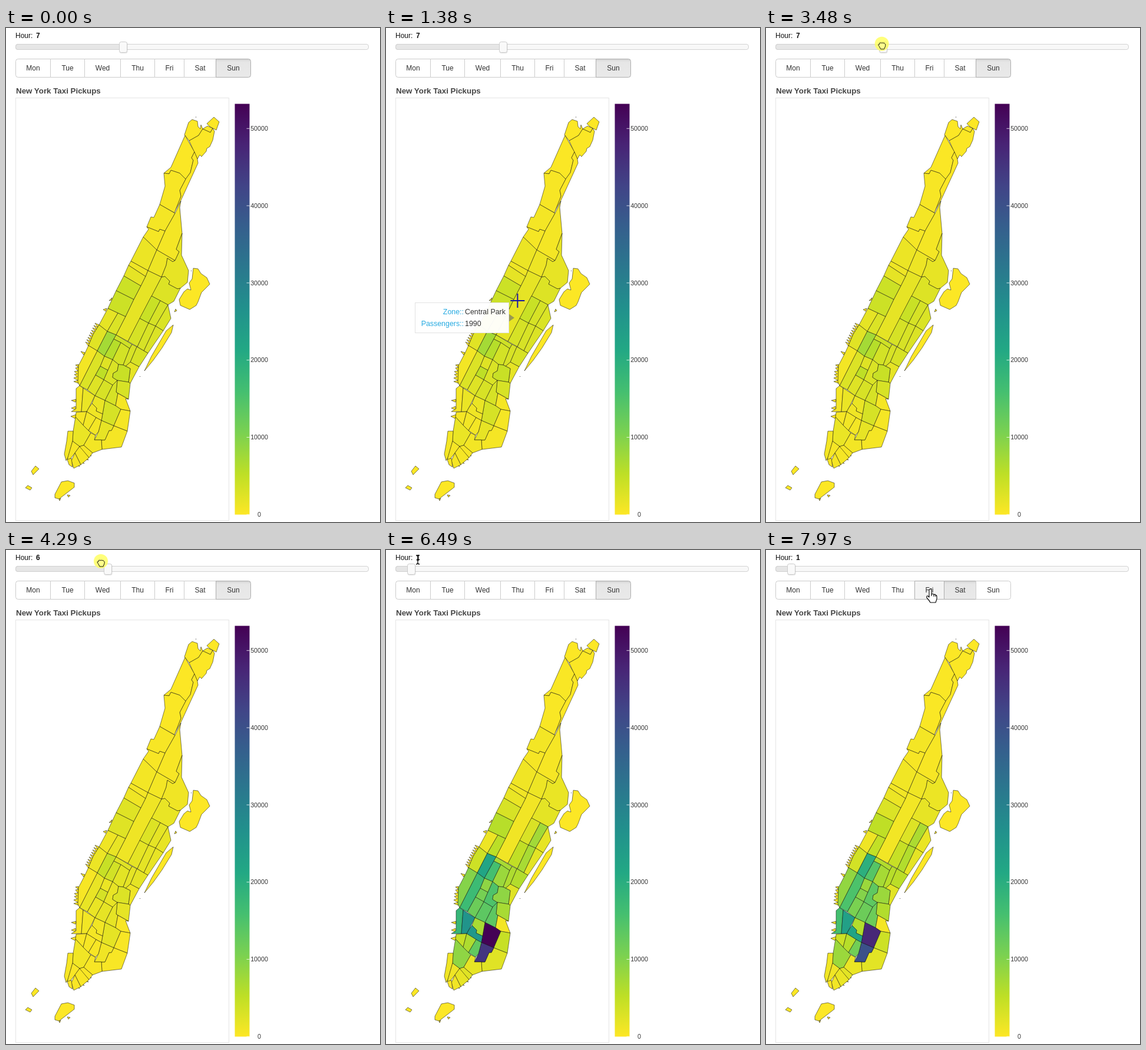
An HTML page that plays this animation: 635x837 px, repeating every 8000 ms.

```html
<!DOCTYPE html>
<html lang="en">
<head>
<meta charset="utf-8">
<title>Taxi pickups</title>
<style>
html, body { margin: 0; width: 100%; height: 100%; overflow: hidden; background: #fff; }
svg { display: block; width: 635px; height: 837px; font: 12px "Liberation Sans", Arial, sans-serif; }
#zones path, #piers { stroke: #000; stroke-opacity: .5; stroke-width: 1; stroke-linejoin: round; }
#piers { fill: #fde725; }
.outline { fill: #fff; stroke: #000; stroke-width: 1.1; stroke-linejoin: round; }
</style>
</head>
<body>
<svg viewBox="0 0 635 837">
  <defs>
    <linearGradient id="scale" x2="0" y2="1"></linearGradient>
    <linearGradient id="pressed" x2="0" y2="1">
      <stop offset="0" stop-color="#d2d2d2"/><stop offset=".16" stop-color="#e6e6e6"/><stop offset="1" stop-color="#e9e9e9"/>
    </linearGradient>
  </defs>

  <text x="16" y="17" fill="#111">Hour:</text>
  <text id="hour" x="51" y="17" fill="#111" font-weight="bold"></text>
  <rect x="16.5" y="27.5" width="599" height="9" rx="3.5" fill="#f8f8f8" stroke="#d3d3d3"/>
  <rect id="done" x="16.5" y="27.5" height="9" rx="3.5" fill="#e6e6e6" stroke="#d0d0d0"/>
  <g id="handle">
    <rect x="-6.5" y="24" width="14" height="19" rx="3" fill="#000" opacity=".1"/>
    <rect x="-6.5" y="23.5" width="13" height="18" rx="3" fill="#f9f9f9" stroke="#ccc"/>
  </g>
  <g id="buttons"></g>

  <text x="17" y="111" font-size="13.33" font-weight="bold" fill="#444">New York Taxi Pickups</text>
  <rect x="16.5" y="118.5" width="362" height="716" fill="#fff" stroke="#e5e5e5"/>
  <path id="piers" d="M158 503l-7-3 5 7-7-3 5 7-7-3 5 7-7-3 5 7-7-3 5 7-7-3 5 7-7-3 5 7-7-3 5 7-7-3 5 7ZM180 457l-5 5 4-1zM171 475l-6 2 4 3zM134 550l-7-2 5 6zM123 570l-5 1 5 4-5 1 4 5-6 1 5 4-5 1 5 4-6 2 7 4-7 2 8 3zM119 629l-8 2 7 3zM118 641l-7 3 7 3zM119 655l-9 3 8 4zM142 722l3 3-4 0zM137 728l3 4-5-1zM129 734l4 4-5-2zM121 737l4 6-5-3z"/>
  <g id="zones">
    <path data-v=".1 .1 .1" d="M341 162L353 151 362 159 357 173 346 167Z"/>
    <path data-v=".1 .1 .1" d="M310 160L316 155 325 158 326 167 330 171 331 164 334 171 327 182 311 191 303 181Z"/>
    <path data-v=".1 .1 .1" d="M334 171L342 166 351 170 347 177Z"/>
    <path data-v=".2 .1 .2" d="M311 191L327 182 334 171 347 177 351 170 354 175 351 190 346 201 341 204 340 209 332 218 329 215 325 222 319 209Z"/>
    <path data-v=".2 .2 .3" d="M304 182L320 210 315 220 318 224 313 245 305 256 295 246 280 241 277 247 268 246 280 236Z"/>
    <path data-v=".1 .1 .1" d="M320 210L325 222 326 229 297 292 285 313 297 285 295 275 305 256 313 245 318 224 315 220Z"/>
    <path data-v=".6 .2 .3" d="M268 246L277 247 280 241 295 246 305 256 295 275 297 285 286 313 261 299 270 268Z"/>
    <path data-v="1 .5 .8" d="M261 299L287 314 270 344 261 341 259 345 239 337 246 320 251 321Z"/>
    <path data-v="1 .4 .6" d="M287 314L297 293 295 304 299 348 289 375 294 379 287 394 256 376 270 344Z"/>
    <path data-v=".8 .4 .6" d="M239 337L259 345 261 341 270 344 256 376 233 354 242 341Z"/>
    <path data-v="1.8 .5 1.1" d="M233 354L256 376 241 411 212 395Z"/>
    <path data-v="1.7 .8 1.3" d="M256 376L287 394 283 396 274 390 272 402 264 422 241 411Z"/>
    <path data-v="2.3 .9 1.6" d="M299 348L298 385 310 411 308 431 296 441 291 442 276 434 278 429 270 421 264 422 272 402 274 390 283 396 287 394 294 379 289 375Z"/>
    <path data-v="3.4 .8 2.1" d="M264 422L270 421 278 429 276 434 291 442 296 441 285 463 275 469 247 454Z"/>
    <path data-v=".1 .1 .1" d="M318 407L326 408 331 416 341 423 346 434 332 448 326 464 323 470 312 477 296 470 294 460 302 447 308 442 314 444 311 432 316 425Z"/>
    <path data-v="1.6 .5 1" d="M212 395L241 411 237 421 208 402Z"/>
    <path data-v="2.4 .8 1.6" d="M208 402L237 421 229 437 200 420Z"/>
    <path data-v="5.2 1.2 3.2" d="M200 420L229 437 217 460 187 445Z"/>
    <path data-v="5.2 2 5.8" d="M187 445L217 460 203 489 173 475Z"/>
    <path data-v="2.5 .7 1.3" d="M173 475L190 483 172 514 158 503Z"/>
    <path data-v="3.6 1.9 5.5" d="M190 483L203 489 187 520 172 514Z"/>
    <path data-v="2.5 .5 1" d="M241 411L264 422 207 531 187 520 203 489 217 460 229 437 237 421Z"/>
    <path data-v="5.5 1.1 3" d="M247 454L262 462 242 500 227 492Z"/>
    <path data-v="4.2 3.8 7.5" d="M262 462L275 469 254 505 242 500Z"/>
    <path data-v="3.7 .8 1.8" d="M275 469L280 492 267 513 254 505Z"/>
    <path data-v="4.2 1.2 5" d="M227 492L242 500 223 540 207 531Z"/>
    <path data-v="4.1 3.4 7" d="M242 500L254 505 234 547 223 540Z"/>
    <path data-v="3.6 1.3 2.2" d="M254 505L267 513 241 551 234 547Z"/>
    <path data-v=".1 .1 .1" d="M284 503L281 516 265 542 250 563 235 581 247 556 272 513Z"/>
    <path data-v="4.1 3 6.2" d="M222 540L241 551 226 574 211 566Z"/>
    <path data-v="2.5 2 2.5" d="M211 566L226 574 211 602 208 600 211 577 203 573Z"/>

    <path data-v="3 2.8 4" d="M158 503L172 514 155 547 140 538 148 519Z"/>
    <path data-v="9.4 15 22" d="M172 514L187 520 183 527 167 556 155 547Z"/>
    <path data-v="5 5 7" d="M187 520L214 536 210 543 195 533 183 527Z"/>
    <path data-v="7.5 9.5 16" d="M183 527L195 533 181 562 167 556Z"/>
    <path data-v="4.5 2.5 8" d="M195 533L210 543 199 571 191 570 181 562Z"/>
    <path data-v="4.1 3.5 6.5" d="M210 543L214 536 222 540 211 566 203 573 199 571Z"/>
    <path data-v="3.2 3.3 9" d="M167 556L181 562 173 580 160 573Z"/>
    <path data-v="6.7 5 11" d="M160 573L173 580 166 596 152 588Z"/>
    <path data-v="3.7 9.3 15" d="M181 562L191 570 189 581 182 585 181 592 189 597 181 605 166 596 173 580Z"/>
    <path data-v="5.7 4 9" d="M191 570L199 571 211 577 208 600 189 597 181 592 182 585 189 581Z"/>
    <path data-v="4 3.7 7" d="M189 597L208 600 211 602 208 629 187 617Z"/>
    <path data-v="4 8 13.5" d="M189 597L187 617 190 619 186 640 168 631 181 605Z"/>
    <path data-v="4 8.5 13.5" d="M166 596L181 605 168 631 151 623Z"/>
    <path data-v="3.3 5.5 12" d="M152 588L166 596 151 623 138 613Z"/>
    <path data-v="3.5 14 17" d="M155 547L167 556 160 573 138 613 125 606Z"/>
    <path data-v="1.1 11 9.8" d="M140 538L155 547 125 606 122 600 123 572 134 551Z"/>

    <path data-v=".8 .6 .8" d="M190 619L208 629 203 628 211 649 195 646 186 640Z"/>
    <path data-v="4.2 33 53" d="M168 631L186 640 195 646 183 674 162 665Z"/>
    <path data-v=".8 2.6 4.5" d="M195 646L211 649 206 683 183 674Z"/>
    <path data-v=".9 1.2 2.4" d="M183 674L206 683 196 710 163 714 162 698 168 698 175 682 179 682Z"/>
    <path data-v="2.3 32 45" d="M162 665L183 674 179 682 175 682 168 698 150 698 157 684Z"/>
    <path data-v=".8 12 18" d="M125 606L131 610 128 650 111 650 119 645 119 611Z"/>
    <path data-v="1.9 14 26" d="M131 610L151 623 141 643 137 650 128 650Z"/>
    <path data-v="2 3 7" d="M151 623L168 631 164 654 153 649 154 644 146 636Z"/>
    <path data-v="1.5 13 25" d="M146 636L154 644 153 649 164 654 162 665 153 660 137 650 141 643Z"/>
    <path data-v=".8 3.4 4.6" d="M119 651L137 650 131 673 118 659Z"/>
    <path data-v="1.2 2.6 6.5" d="M137 650L153 660 140 682 131 673Z"/>
    <path data-v="1.1 9 13" d="M153 660L162 665 157 684 152 690 140 682Z"/>
    <path data-v="2 5.1 9" d="M118 659L131 673 144 686 132 707 125 709 113 700 114 683Z"/>
    <path data-v="1.1 1 1.8" d="M144 686L152 690 150 698 162 698 163 714 147 720 132 707Z"/>
    <path data-v="1 .7 1.1" d="M105 683L114 683 113 700 106 726 102 733 99 722 103 700Z"/>
    <path data-v=".7 .8 1.2" d="M113 700L125 709 117 720 107 733 104 731Z"/>
    <path data-v=".9 1.8 2.5" d="M125 709L132 707 147 720 141 728 128 714Z"/>
    <path data-v=".8 1 1.8" d="M125 709L141 728 127 740 117 720Z"/>
    <path data-v=".7 .5 1" d="M117 720L127 740 115 746 111 733Z"/>
    <path data-v=".2 .2 .2" d="M104 731L111 729 113 744 107 740Z"/>
    <path data-v=".1 .1 .1" d="M94 769L105 767 116 771 116 778 90 798 83 796 83 790Z"/>
    <path data-v=".1 .1 .1" d="M43 751L50 742 56 747 46 757ZM33 779L37 775 44 779 41 783ZM90 798L93 797 91 801ZM104 791L109 792 106 795Z"/>
    <path data-v=".1 .1 .1" d="M286 481L288 476 290 479ZM322 151l1 0ZM314 411l1 1ZM227 590l1 1Z"/>
  </g>

  <rect x="388.5" y="128.5" width="25" height="696" fill="url(#scale)"/>
  <g id="axis" fill="#333" font-size="10.67" text-anchor="middle"></g>

  <g id="tip">
    <path d="M-10 -7L0 0L-10 7Z" fill="#70706a" opacity=".65"/>
    <rect id="tipBox" y="-25.5" height="51" fill="#fff" fill-opacity=".96" stroke="#e2e2e2"/>
    <g id="tipText" font-size="12.4">
      <g fill="#26aae1" text-anchor="end"><text x="82" y="-6">Zone::</text><text x="82" y="14">Passengers::</text></g>
      <g fill="#333"><text id="place" x="84" y="-6"></text><text id="count" x="84" y="14"></text></g>
    </g>
  </g>

  <circle id="halo" r="12" fill="#ffff5a" opacity=".8"/>
  <g id="cursor">
    <path id="cross" d="M0 -12V12M-12 0H12" stroke="#1616a6" stroke-width="2"/>
    <path id="arrow" class="outline" d="M0 0V16L4 12.5 6.500 18 9 17 6.500 11.500H11.500Z"/>
    <path id="point" class="outline" d="M-2 2Q-2 0 0 0T2 2V9Q5 7 6 10 8 8 9 10.500 11 10 11 13V17Q10 20 9 23H0Q-2 19 -6 15-7 11 -4 12L-2 14ZM2 9V12M6 10V13M9 11V13"/>
    <path id="fist" class="outline" style="fill:#ffff8c;stroke-width:.9" d="M-4 3L-6 0Q-6 -2 -4 -1V-3Q-3 -5 -1 -3 0 -5 2 -3 4 -5 5 -2 7 -2 6 2L4 7H-2Z"/>
    <path id="beam" d="M-3 -7Q0 -7 0 -5 0 -7 3 -7M0 -5V6M-3 8Q0 8 0 6 0 8 3 8M-2 1H2" fill="none" stroke="#000" stroke-width="1.300"/>
  </g>
</svg>
<script>
const LOOP = 8000, MAX = 53.2;
const $ = id => document.getElementById(id);
const clamp = (v, a, b) => Math.max(a, Math.min(b, v));
const mix = (a, b, k) => a + (b - a) * k;

function add(parent, tag, attrs, text = "") {
  const el = document.createElementNS("http://www.w3.org/2000/svg", tag);
  for (const k in attrs) el.setAttribute(k, attrs[k]);
  el.textContent = text;
  return parent.appendChild(el);
}

// Viridis, from high values to low
const palette = ["440154", "482475", "414487", "355f8d", "2a788e", "21918c", "22a884", "44bf70", "7ad151", "bddf26", "fde725"];
const rgb = palette.map(h => [0, 2, 4].map(i => parseInt(h.slice(i, i + 2), 16)));
function color(v) {
  const p = clamp(1 - v / MAX, 0, 1) * 10, i = Math.min(9, Math.floor(p));
  return `rgb(${rgb[i].map((c, j) => Math.round(mix(c, rgb[i + 1][j], p - i)))})`;
}
palette.forEach((c, i) => add($("scale"), "stop", { offset: i / 10, "stop-color": "#" + c }));
for (let i = 0; i < 6; i++) {
  const y = 824 - i * 130.8;
  add($("axis"), "path", { d: `M408.5 ${y + .3}h5`, stroke: "#fff", "stroke-opacity": .8 });
  add($("axis"), "text", { x: 430, y: y + 4 }, i * 10000);
}

const edges = [16.5, 75.5, 133.5, 194.5, 252.5, 302.5, 356.5, 415.5];
const round = (x0, x1, l, r) =>
  `M${x0 + l} 52.500H${x1 - r}q${r} 0 ${r} ${r}V${83.5 - r}q0 ${r} ${-r} ${r}H${x0 + l}q${-l} 0 ${-l} ${-l}V${52.5 + l}q0 ${-l} ${l} ${-l}Z`;
const buttons = ["Mon", "Tue", "Wed", "Thu", "Fri", "Sat", "Sun"].map((day, i) => {
  const x0 = edges[i], x1 = edges[i + 1];
  const box = add($("buttons"), "path", { d: round(x0, x1, i ? 0 : 4, i < 6 ? 0 : 4) });
  add($("buttons"), "text", { x: (x0 + x1) / 2, y: 72, fill: "#333", "text-anchor": "middle" }, day);
  return box;
});

// Each zone holds its morning peak and its counts at 3 and 1 o'clock, in thousands
const AT_SEVEN = .78, AT_SIX = .48;
const zones = [...document.querySelectorAll("#zones path")].map(el => ({ el, v: el.dataset.v.split(" ").map(Number) }));
function pickups([peak, three, one], hour, sat) {
  if (hour < 3) return mix(one, three, (hour - 1) / 2) * (sat ? .89 : 1);
  if (hour === 7) return peak * AT_SEVEN;
  return mix(three, peak * AT_SIX, (hour - 3) / 3);
}

// Pointer moves: start, end, number of steps
const bursts = [[380, 1070, 10], [1220, 1800, 8], [1940, 2710, 11], [2770, 2880, 2], [3420, 3820, 6],
  [4290, 4530, 4], [4840, 5250, 6], [6660, 7410, 10], [7580, 7970, 6]];
const track = [
  [380, 410, 796], [760, 295, 620], [990, 230, 510], [1070, 218, 491], [1140, 218, 491], [1380, 223, 463], [1800, 250, 393],
  [1863, 250, 393], [1940, 257, 368], [2330, 226, 150], [2556, 201, 66], [2710, 202, 61], [2770, 202, 45], [2880, 202, 31],
  [3340, 202, 31], [3700, 178, 12], [3820, 168, 18], [4210, 168, 18], [4290, 161, 19], [4530, 100, 17],
  [4760, 100, 17], [4930, 82, 16], [5250, 51, 16], [6480, 51, 16], [6490, 54, 16], [6580, 54, 16], [6660, 72, 22], [7000, 190, 58],
  [7410, 330, 72], [7736, 330, 72], [7970, 279, 66]];

function snap(t) {
  let out = t;
  for (const [a, b, n] of bursts) {
    if (t < a) break;
    const step = (b - a) / (n - 1);
    out = a + Math.min(n - 1, Math.floor((t - a) / step + .15)) * step;
  }
  return t >= 6490 && t < 6660 ? 6490 : out;
}
function pointer(t) {
  const i = track.findIndex(k => k[0] > t);
  if (i < 1) return track[i < 0 ? track.length - 1 : 0].slice(1);
  const [a, b] = [track[i - 1], track[i]], k = (t - a[0]) / (b[0] - a[0]);
  return [mix(a[1], b[1], k), mix(a[2], b[2], k)];
}

const tips = [
  [910, 1065, 230, 510, 210, "Upper East Side South", 3276],
  [1065, 1630, 218, 491, 159, "Central Park", 1990],
  [1710, 2010, 250, 393, 173, "Central Harlem", 1326]];

function shape(t, y) {
  if (t < 380) return "";
  if (t < 2300) return "cross";
  if (t >= 2870 && t < 6480) return "fist";
  if (t >= 6480 && t < 6740) return "beam";
  return y > 52 && y < 84 || t > 2550 && t < 2870 ? "point" : "arrow";
}
const show = (id, on) => $(id).setAttribute("display", on ? "inline" : "none");

let last = "";
function draw(t) {
  const [x, y] = pointer(snap(t)), kind = shape(t, y);
  const hour = t < 3400 ? 7 : t > 5240 ? 1 : clamp(Math.round((x - 14) / 26.05), 1, 7);
  const sat = t >= 7650;

  $("hour").textContent = hour;
  const hx = 16.9 + hour * 26.05;
  $("done").setAttribute("width", hx - 16.5);
  $("handle").setAttribute("transform", `translate(${Math.round(hx)})`);

  buttons.forEach((box, i) => {
    const active = i === (sat ? 5 : 6);
    const hover = kind === "point" && y > 52 && y < 84 && x > edges[i] && x < edges[i + 1];
    box.setAttribute("fill", active ? "url(#pressed)" : hover ? "#f3f3f3" : "#fff");
    box.setAttribute("stroke", active || hover ? "#adadad" : "#ccc");
  });

  const state = hour + "/" + sat;
  if (state !== last) zones.forEach(z => z.el.setAttribute("fill", color(pickups(z.v, hour, sat))));
  last = state;

  const tip = tips.find(k => t >= k[0] && t < k[1]);
  show("tip", tip);
  if (tip) {
    const [, , tx, ty, w, name, n] = tip, left = -9.5 - w;
    $("tip").setAttribute("transform", `translate(${tx} ${ty})`);
    $("tipBox").setAttribute("x", left);
    $("tipBox").setAttribute("width", w);
    $("tipText").setAttribute("transform", `translate(${left + .5})`);
    $("place").textContent = name;
    $("count").textContent = n;
  }

  show("halo", t >= 3250 && t < 6490 || t >= 7580 && t < 7730);
  $("halo").setAttribute("cx", x);
  $("halo").setAttribute("cy", y);
  for (const id of ["cross", "arrow", "point", "fist", "beam"]) show(id, id === kind);
  $("cursor").setAttribute("transform", `translate(${x} ${y + (kind === "fist" ? 2 : 0)})`);
}

const start = performance.now();
function tick() {
  draw((performance.now() - start) % LOOP);
  requestAnimationFrame(tick);
}
tick();
</script>
</body>
</html>
```
